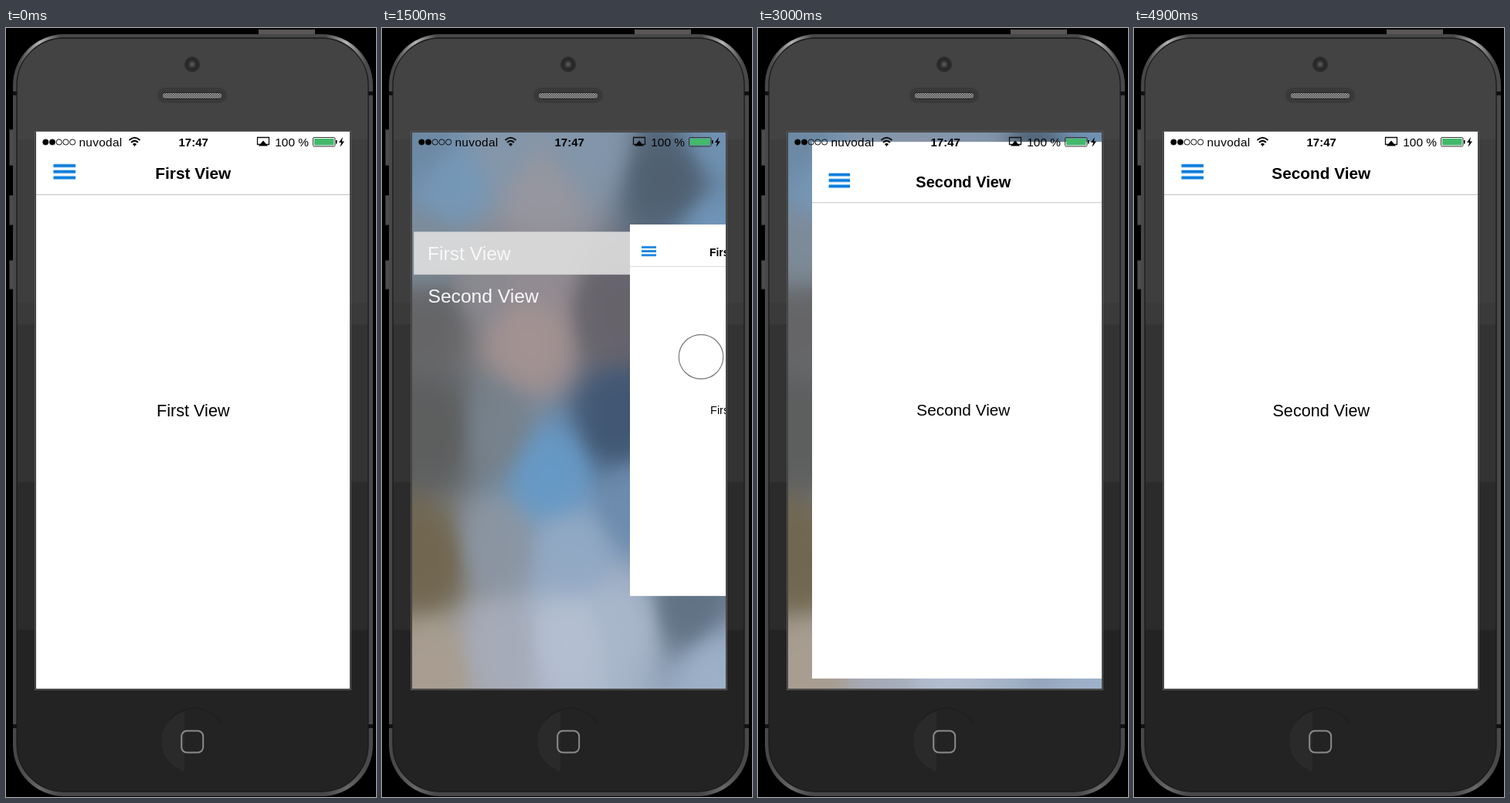
An HTML page with a canvas for the animation above (5000 ms loop, 479 px wide and 994 px high).

```html
<!DOCTYPE html>
<html lang="en">
<head>
<meta charset="utf-8">
<title>Side menu</title>
<style>
  html, body { margin: 0; width: 100%; height: 100%; overflow: hidden; background: #000; }
  svg, canvas { position: absolute; display: block; }
  svg { left: 0; top: 0; width: 479px; height: 994px; }
  canvas { left: 39px; top: 135px; width: 406px; height: 719px; }
  text { font-family: "Liberation Sans", Arial, Helvetica, sans-serif; }
  .mid { text-anchor: middle; }
  .bold { font-weight: 700; }
</style>
</head>
<body>
<svg viewBox="0 0 479 994">
  <defs>
    <linearGradient id="body" gradientUnits="userSpaceOnUse" x1="0" y1="0" x2="0" y2="1000">
      <stop offset=".144" stop-color="#434343"/><stop offset=".144" stop-color="#3e3e3e"/>
      <stop offset=".355" stop-color="#3e3e3e"/><stop offset=".355" stop-color="#3a3a3a"/>
      <stop offset=".383" stop-color="#3a3a3a"/><stop offset=".383" stop-color="#333"/>
      <stop offset=".587" stop-color="#333"/><stop offset=".587" stop-color="#2b2b2b"/>
      <stop offset=".778" stop-color="#2b2b2b"/><stop offset=".778" stop-color="#232323"/>
    </linearGradient>
    <linearGradient id="shine">
      <stop offset="0" stop-color="#aaa" stop-opacity="0"/>
      <stop offset=".5" stop-color="#b4b4b4"/>
      <stop offset="1" stop-color="#aaa" stop-opacity="0"/>
    </linearGradient>
    <pattern id="mesh" width="3" height="3" patternUnits="userSpaceOnUse">
      <rect width="3" height="3" fill="#4a4a4a"/>
      <path d="M0 0h1.5v1.5H0zM1.5 1.5H3V3H1.5z" fill="#a2a2a2"/>
    </pattern>
    <clipPath id="half"><rect x="200" y="880" width="31" height="84"/></clipPath>
  </defs>
  <rect x="327" y="2" width="73" height="8" fill="#5a5656"/>
  <g fill="#4d4b4b" stroke="#2c2c2c">
    <rect x="4.5" y="131.5" width="6" height="46"/>
    <rect x="4.5" y="216.5" width="6" height="38"/>
    <rect x="4.5" y="300.5" width="6" height="37"/>
  </g>
  <rect x="9" y="8" width="466" height="985" rx="66" fill="#484848"/>
  <g fill="none" stroke="url(#shine)" stroke-width="4">
    <path d="M17 52C25 29 42 14 70 10.5"/>
    <path d="M467 52C459 29 442 14 414 10.5"/>
    <path d="M17 949C25 972 42 987 70 990.5" opacity=".3"/>
    <path d="M467 949C459 972 442 987 414 990.5" opacity=".3"/>
  </g>
  <path d="M9 82h6v5H9zM469 82h6v5h-6zM9 900h6v5H9zM469 900h6v5h-6z" fill="#111"/>
  <rect x="14" y="13" width="455" height="974" rx="61" fill="url(#body)" stroke="#191919" stroke-width="1.3"/>
  <circle cx="241" cy="47" r="10" fill="#2b2b2b"/>
  <circle cx="241" cy="47" r="6" fill="#383838" stroke="#1c1c1c"/>
  <circle cx="241" cy="47" r="2.5" fill="#555"/>
  <rect x="196" y="77" width="90" height="20" rx="10" fill="#393939"/>
  <rect x="202" y="83.5" width="78" height="8" rx="4" fill="url(#mesh)" stroke="#222"/>
  <circle cx="241" cy="922" r="40" fill="#2a2a2a" clip-path="url(#half)"/>
  <path d="M212 895A40 40 0 0 1 278 898" fill="none" stroke="#1b1b1b"/>
  <rect x="227.2" y="908.5" width="28" height="28" rx="7" fill="none" stroke="#8b8b8b" stroke-width="2"/>
  <rect x="37.5" y="133.5" width="409" height="722" fill="#3a3a3a" stroke="#585858"/>
</svg>

<canvas id="wall" width="203" height="360"></canvas>

<svg viewBox="0 0 479 994">
  <defs><clipPath id="screen"><rect x="39" y="134" width="406" height="720"/></clipPath></defs>
  <g clip-path="url(#screen)">
    <g id="menu" fill="#fff" font-size="24.9">
      <rect id="row" x="39" y="261" width="406" height="56" fill="#dedede" opacity=".96"/>
      <text x="57" y="298">First View</text>
      <text x="57.5" y="353.5">Second View</text>
    </g>
    <g id="panel">
      <rect x="39" y="134" width="406" height="720" fill="#fff"/>
      <path d="M39 215.5H445" stroke="#c4c4c4"/>
      <path d="M61.5 178h28.5M61.5 185.7h28.5M61.5 193.5h28.5" stroke="#b9dcf7" stroke-width="5.5"/>
      <path d="M61.5 178h28.5M61.5 185.7h28.5M61.5 193.5h28.5" stroke="#0b7ddd" stroke-width="3.5"/>
      <text id="title" class="mid bold" x="242.3" y="195" font-size="20.8"></text>
      <text id="label" class="mid" x="242.3" y="501.5" font-size="21.6"></text>
    </g>
    <circle id="touch" r="28.7" fill="#fff" stroke="#777" stroke-width="1.2"/>
    <g id="status">
      <g id="signal" stroke="#111"></g>
      <g fill="none" stroke="#111">
        <path d="M329 150.5h-3.500v-9h15v9h-3.500" stroke-width="1.3"/>
        <rect x="397.5" y="141.5" width="28.5" height="11.5" rx="1.5" stroke="#333"/>
        <path d="M159.500 145Q166.500 138.500 173.500 145M162 148Q166.500 143.800 171 148" stroke-width="2"/>
      </g>
      <path d="M333 145.500l6 7h-12zM166.500 153l-2.600-3q2.600-2 5.200 0zM427 145h1.500v4.500H427z
        M436 141l-5 7h3l-1.500 6 5.500-7.500h-3.200z"/>
      <rect x="399" y="143" width="25.5" height="8.5" fill="#43b96b"/>
      <text x="94.5" y="153" font-size="15.4" letter-spacing=".3">nuvodal</text>
      <text class="mid bold" x="242.7" y="153" font-size="15">17:47</text>
      <text x="348.3" y="153" font-size="15.4">100 %</text>
    </g>
  </g>
</svg>

<script>
const $ = id => document.getElementById(id);
const LOOP = 5000, STEP = 100;

// Blurred wallpaper: soft colour spots [x, y, colour], blended by distance
const spots = [
  [55, 145, 0x6c88a3], [90, 195, 0x7598b8], [150, 150, 0x8496aa], [205, 215, 0x96969f],
  [260, 150, 0x8295aa], [375, 195, 0x4f5f70], [430, 265, 0x7095b8], [435, 140, 0x7092b2],
  [55, 295, 0x7d8b98], [130, 320, 0x8a8a90], [60, 370, 0x646466], [195, 310, 0x918b92],
  [190, 400, 0xa39292], [300, 365, 0x66636b], [75, 520, 0x5c5d5d], [140, 520, 0x77828c],
  [215, 580, 0x6699c6], [310, 510, 0x405672], [330, 610, 0x6d8cae], [400, 500, 0x53657a],
  [55, 690, 0x71664f], [65, 825, 0xa89d90], [150, 670, 0x8b95a2], [240, 680, 0x92a9c4],
  [150, 800, 0xa5abb8], [240, 785, 0xb4bfd1], [320, 770, 0xa9b7cb], [390, 750, 0x5f7183],
  [430, 835, 0x9db0c8]
];

function paintWall() {
  const c = $("wall"), g = c.getContext("2d");
  const img = g.createImageData(c.width, c.height);
  for (let y = 0, i = 0; y < c.height; y++) {
    for (let x = 0; x < c.width; x++, i += 4) {
      let sum = 0, r = 0, gr = 0, b = 0;
      for (const [sx, sy, col] of spots) {
        const dx = 39 + x * 2 - sx, dy = 135 + y * 2 - sy;
        const w = (dx * dx + dy * dy * .7 + 1800) ** -3;
        sum += w;
        r += w * (col >> 16);
        gr += w * (col >> 8 & 255);
        b += w * (col & 255);
      }
      img.data[i] = r / sum;
      img.data[i + 1] = gr / sum;
      img.data[i + 2] = b / sum;
      img.data[i + 3] = 255;
    }
  }
  g.putImageData(img, 0, 0);
}

function addSignal() {
  for (let i = 0; i < 5; i++) {
    const dot = document.createElementNS("http://www.w3.org/2000/svg", "circle");
    dot.setAttribute("cx", 51.3 + i * 8.7);
    dot.setAttribute("cy", 147.5);
    dot.setAttribute("r", 3.6);
    dot.setAttribute("fill", i < 2 ? "#000" : "none");
    $("signal").append(dot);
  }
}

// Left edge of the panel: [ms, x]
const slide = [
  [0, 39], [200, 39], [400, 56], [700, 115], [1100, 219], [1500, 321], [1600, 333], [1700, 337],
  [2700, 337], [2800, 285], [2900, 165], [3000, 70], [3100, 39],
  [3300, 39], [3450, 70], [3700, 153], [3900, 235], [4100, 278], [4250, 270], [4400, 240],
  [4500, 190], [4600, 100], [4700, 52], [4800, 39], [5000, 39]
];

// Touches: from, to, grip offset from the panel edge, y at both ends
const drags = [
  { from: 200, to: 1500, grip: 92, y0: 418.5, y1: 425 },
  { from: 3300, to: 4400, grip: 68, y0: 346.5, y1: 384 }
];
const tap = { from: 2500, to: 2600, x: 140, y: 346 };
const SWITCH = 2600;

function at(table, t) {
  const i = table.findIndex(k => k[0] > t);
  const [t0, a] = table[i - 1], [t1, b] = table[i];
  return a + (b - a) * (t - t0) / (t1 - t0);
}

function zoom(id, x, y, s, cx, cy) {
  $(id).setAttribute("transform", `translate(${x} ${y}) scale(${s}) translate(${-cx} ${-cy})`);
}

function touchPoint(t, left) {
  const held = d => t >= d.from && t <= d.to;
  if (held(tap)) return [tap.x, tap.y];
  const d = drags.find(held);
  return d && [left + d.grip, d.y0 + (d.y1 - d.y0) * (t - d.from) / (d.to - d.from)];
}

function draw(t) {
  const left = at(slide, t), p = (left - 39) / 298;
  const second = t >= SWITCH;
  zoom("panel", left, 494.2, 1 - .352 * p, 39, 494.2);
  zoom("menu", 242, 480, .8 + .2 * p, 242, 480);
  $("menu").setAttribute("opacity", p);
  $("row").setAttribute("y", second ? 317 : 261);
  $("title").textContent = $("label").textContent = second ? "Second View" : "First View";
  const pos = touchPoint(t, left), dot = $("touch");
  dot.setAttribute("visibility", pos ? "visible" : "hidden");
  if (pos) {
    dot.setAttribute("cx", pos[0]);
    dot.setAttribute("cy", pos[1]);
  }
}

paintWall();
addSignal();
draw(0);
const start = performance.now();
function tick() {
  const t = (performance.now() - start) % LOOP;
  draw(Math.floor(t / STEP) * STEP);
  requestAnimationFrame(tick);
}
requestAnimationFrame(tick);
</script>
</body>
</html>
```
